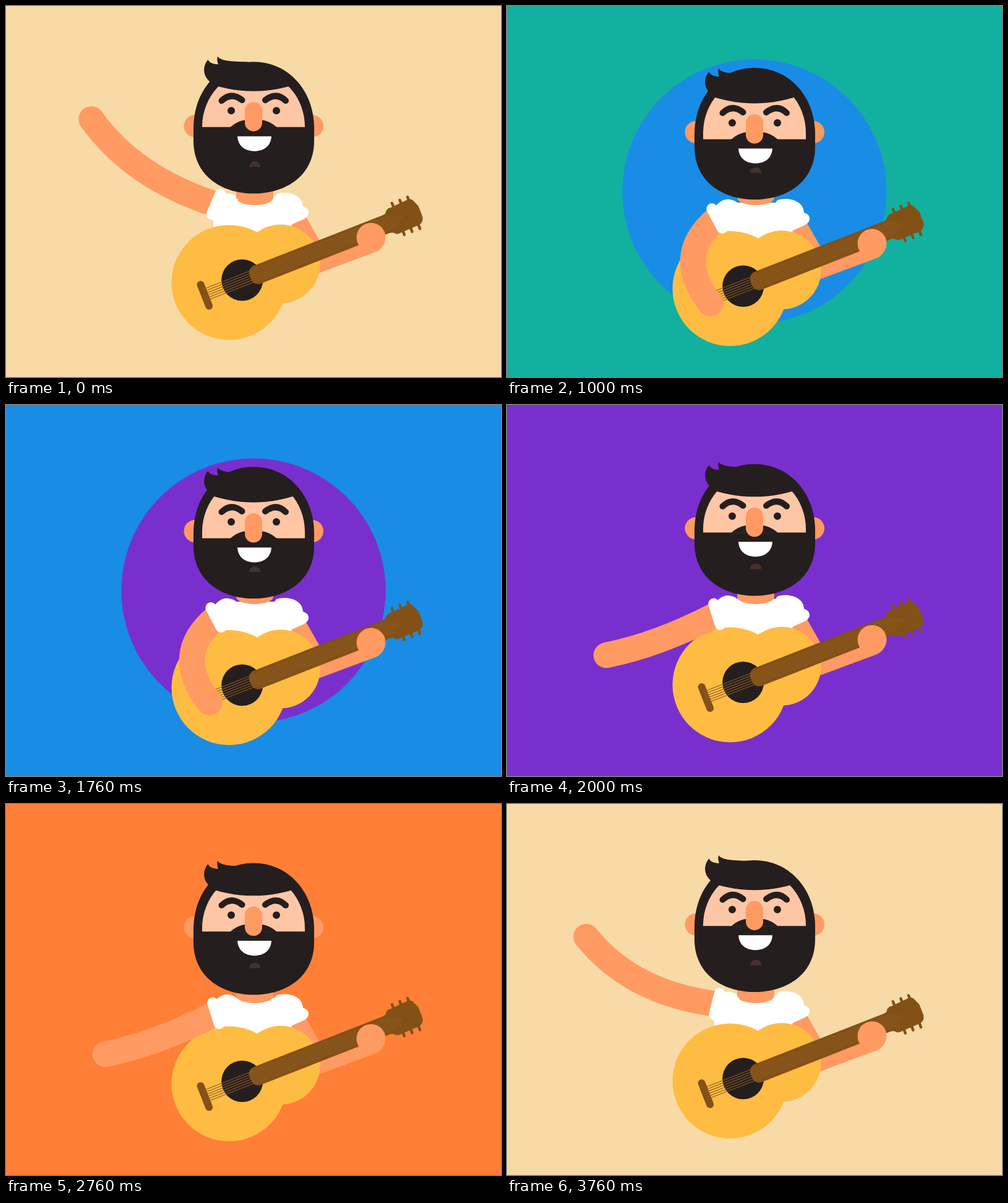
These frames come from a looping animation (800x600 px, 3800 ms). An HTML page with a canvas:

```html
<!DOCTYPE html>
<html lang="en">
<head>
<meta charset="utf-8">
<title>Guitar player</title>
<style>
html, body { margin: 0; width: 100%; height: 100%; overflow: hidden; }
canvas { display: block; }
</style>
</head>
<body>
<canvas id="stage" width="800" height="600"></canvas>
<script>
const ctx = document.getElementById('stage').getContext('2d');
const LOOP = 3800, BEAT = 760, STEP = 40, REST = 240, STRUM = 200;
const BACKDROPS = ['#f7daa6', '#12b09f', '#198ce6', '#792fce', '#ff7f36'];
const SKIN = '#ff9a62', FACE = '#ffc6a5', DARK = '#251e1e', WOOD = '#835116', BODY = '#ffbc42', WHITE = '#fff';

// Each swing follows one cubic path for the hand and one for the elbow
const LOW = { hand: [329, 481], elbow: [267, 404] };
const HIGH = { hand: [138, 183], elbow: [206, 278] };
const RAISE = {
  hand: [LOW.hand, [166, 505], [84, 316], HIGH.hand],
  elbow: [LOW.elbow, [307, 389], [172, 411], HIGH.elbow]
};
const STRIKE = {
  hand: [HIGH.hand, [466, -33], [350, 420], LOW.hand],
  elbow: [HIGH.elbow, [302, 146], [235, 370], LOW.elbow]
};

function cubic([a, b, c, d], u) {
  const v = 1 - u;
  return [0, 1].map(i => v * v * v * a[i] + 3 * u * v * v * b[i] + 3 * u * u * v * c[i] + u * u * u * d[i]);
}

function shape(path, color) {
  ctx.fillStyle = color;
  ctx.fill(new Path2D(path));
}

function line(path, color, width, cap = 'round') {
  ctx.strokeStyle = color;
  ctx.lineWidth = width;
  ctx.lineCap = cap;
  ctx.lineJoin = 'round';
  ctx.stroke(new Path2D(path));
}

function disc(x, y, r, color) {
  ctx.fillStyle = color;
  ctx.beginPath();
  ctx.arc(x, y, r, 0, Math.PI * 2);
  ctx.fill();
}

function block(x, y, w, h, r, color) {
  ctx.fillStyle = color;
  ctx.beginPath();
  ctx.roundRect(x, y, w, h, r);
  ctx.fill();
}

function shifted(dy, draw) {
  ctx.save();
  ctx.translate(0, dy);
  draw();
  ctx.restore();
}

function drawBackdrop(time) {
  const i = Math.floor(time / BEAT), phase = time % BEAT;
  ctx.fillStyle = BACKDROPS[i];
  ctx.fillRect(0, 0, 800, 600);
  if (phase > 160) {
    const r = 213.5 * ((phase - 160) / 80) ** 1.6;
    disc(400, 300, r, BACKDROPS[(i + 1) % BACKDROPS.length]);
  }
}

function drawTorso() {
  line('M455 342 L500 421 L590 387.5', SKIN, 43);
  shape('M335 385 V327 Q345 312 358 312.5 Q369 314 372 318 H434 L437 314'
    + ' C450 309 479 312 480 334 Q490 337 489 346 Q487 352 480 355 L462 363 L455 385 Z', WHITE);
}

function drawNeck() {
  shape('M372 285 H432 V310 C431 326 373 326 372 310 Z', SKIN);
}

function drawHead() {
  disc(305.5, 204, 18, SKIN);
  disc(495, 204, 18, SKIN);
  shape('M303 208 C303 145 345 100 400 100 C455 100 498 145 498 208 V228'
    + ' C498 282 455 313 400 313 C346 313 303 282 303 228 Z', DARK);
  shape('M393 270 C393 258 411 258 411 270 Z', '#43332c');
}

// Skin shows through a window fixed to the head, between fringe and beard
function drawCheeks(headY, faceY) {
  ctx.save();
  ctx.translate(0, headY);
  ctx.clip(new Path2D('M317 205 A83 89 0 0 1 483 205 V240 H317 Z'));
  ctx.translate(0, faceY - headY);
  shape('M300 215.5 V134 Q400 181 500 134 V215.5 Z', FACE);
  ctx.restore();
}

function drawFace() {
  shape('M335 146 C317 136 317 117 326.5 106.5 C329 112 335 114 343 114'
    + ' C341 110 341 105 342 101 C346 108 362 110 390 110 L400 140 Z', DARK);
  shape('M362 216 C372 208 380 203 400 203 S428 208 438 216 Z', DARK);
  line('M348.5 173 Q364 158 381.5 172 M419 172 Q437 158 452 173', DARK, 10);
  disc(364, 189, 6, DARK);
  disc(437, 189, 6, DARK);
  block(386, 175, 28, 47.5, 14, SKIN);
  shape('M374 230.5 H429 C428 246 417 254.5 401.5 254.5 C386 254.5 375 246 374 230.5 Z', WHITE);
}

function drawGuitar() {
  disc(360.5, 457, 93, BODY);
  disc(444, 427, 63.7, BODY);
  disc(381.7, 453, 33.5, DARK);
  ctx.save();
  ctx.translate(381.5, 453);
  ctx.rotate(-21.4 * Math.PI / 180);
  ctx.translate(0, 0.5);
  line('M-65 -18 V19', WOOD, 12);
  for (let i = 0; i < 3; i++) line(`M${271 + 13.5 * i} -28 V27`, WOOD, 4.5);
  block(14, -15.2, 255, 31, 12, WOOD);
  shape('M250 -15 Q255 -15 257 -19 Q260 -23 266 -22 L295 -24 Q301 -25 304 -20'
    + ' L309 -8 V10 Q308 19 299 21 L268 22 Q260 23 257 19 Q255 16 250 15.8 Z', WOOD);
  for (let i = 0; i < 6; i++) {
    const y = -9.5 + 3.8 * i;
    line(`M-65 ${y} H16`, '#8b5a22', 1.1, 'butt');
    line(`M16 ${y} H${262 + 8 * Math.min(i, 5 - i)}`, '#92612a', 0.8, 'butt');
  }
  ctx.restore();
  disc(590, 384, 23.5, SKIN);
}

// The shoulder and cuff follow the angle of the upper arm
function drawArm(phase, dy) {
  const swing = phase < REST ? STRIKE : RAISE;
  const u = phase < REST ? Math.min(1, phase / STRUM) : (phase - REST) / (BEAT - REST);
  const [hx, hy] = cubic(swing.hand, u), [ex, ey] = cubic(swing.elbow, u);
  const rise = Math.atan2(325 - ey, 340 - ex), s = Math.sin(rise);
  const sx = 339.5, sy = 326 - 18 * s + 8 * s * s;
  line(`M${sx} ${sy} Q${ex} ${ey} ${hx} ${hy}`, SKIN, 41.5, 'butt');
  disc(hx, hy, 20.75, SKIN);
  const cuff = 1.71 + 0.76 * rise;
  const dx = 17.5 * Math.cos(cuff), dv = 17.5 * Math.sin(cuff);
  const top = `${sx - dx} ${sy - dv}`, bottom = `${sx + dx} ${sy + dv}`;
  shape(`M${top} L375 ${322 + dy} L370 ${355 + dy} L${bottom} Z`, WHITE);
  line(`M${top} L${bottom}`, WHITE, 18);
}

function drawScene(time) {
  const phase = time % BEAT;
  const lift = phase < REST ? Math.max(0, 1 - phase / 190) : (phase - REST) / (BEAT - REST);
  const headY = -9.8 * lift, faceY = -19.8 * lift;
  drawBackdrop(time);
  shifted(headY, drawTorso);
  drawNeck();
  shifted(headY, drawHead);
  drawCheeks(headY, faceY);
  shifted(faceY, drawFace);
  shifted(headY, drawGuitar);
  drawArm(phase, headY);
}

const start = performance.now();
function tick() {
  const time = (performance.now() - start) % LOOP;
  drawScene(Math.floor(time / STEP) * STEP);
  requestAnimationFrame(tick);
}
tick();
</script>
</body>
</html>
```
